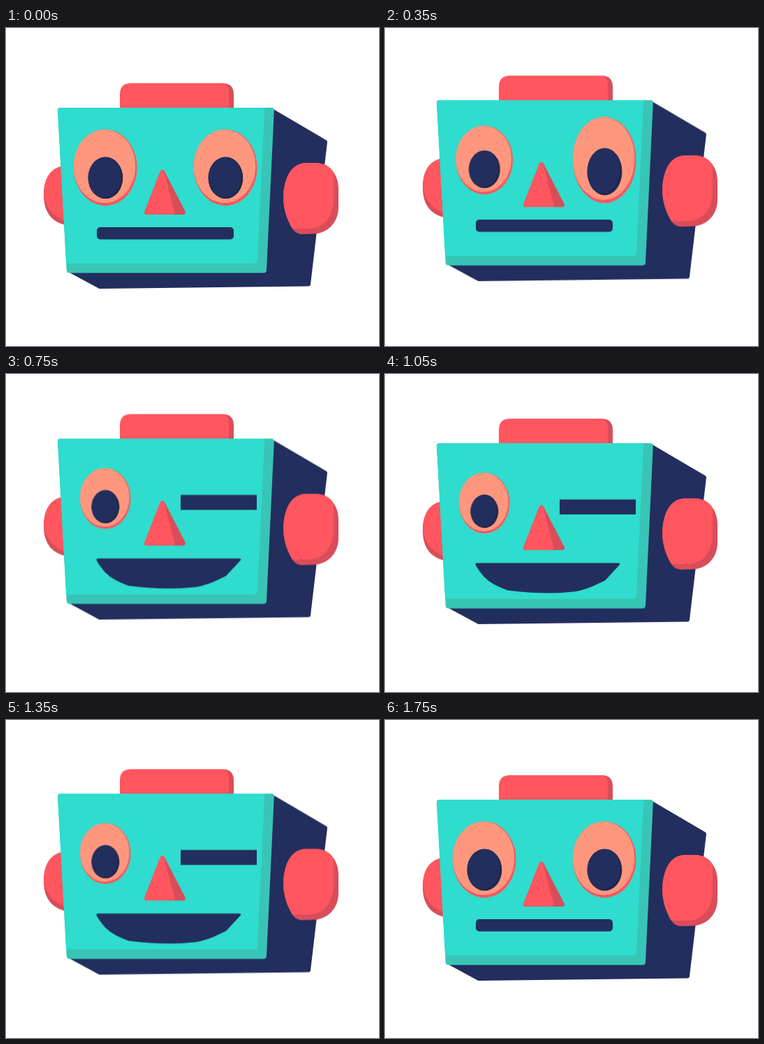
An HTML page for the animation above (1850 ms loop, 534 px wide and 455 px high).

```html
<!DOCTYPE html>
<html lang="en">
<head>
<meta charset="utf-8">
<title>Winking robot</title>
<style>
  html, body { margin: 0; width: 100%; height: 100%; overflow: hidden; background: #fff; }
  svg { display: block; width: 100vw; height: 100vh; }

  .red { fill: #ff565f; }
  .red-dark { fill: #d94d59; }
  .teal { fill: #2fdccd; }
  .teal-dark { fill: #38c5b6; }
  .navy { fill: #222e5e; }
  .navy-dark { fill: #1f274e; }
  .peach { fill: #ff977e; }
  .soft { stroke-linejoin: round; stroke-width: 6; }
  .teal.soft { stroke: #2fdccd; }
  .navy.soft { stroke: #222e5e; }
  .red.soft { stroke: #ff565f; }
  .red-dark.soft { stroke: #d94d59; }

  .head, .left, .right, .plain, .wink { animation: 1850ms infinite; }
  .head { animation-name: bob; }
  .left { animation-name: shrink; transform-origin: 142px 200px; }
  .right { animation-name: stretch; transform-origin: 314px 200px; }
  .plain { animation-name: hide; }
  .wink { animation-name: show; }

  /* Poses change at 50 ms, then every 100 ms */
  @keyframes bob {
    0% { transform: translateY(0); animation-timing-function: step-end; }
    2.7027% { transform: translateY(-2.7px); animation-timing-function: steps(7); }
    40.5405% { transform: translateY(-21.6px); animation-timing-function: steps(10); }
    94.5945%, 100% { transform: translateY(0); }
  }
  @keyframes shrink {
    0% { transform: scale(1); animation-timing-function: step-end; }
    2.7027% { transform: scale(.975); animation-timing-function: steps(7); }
    40.5405% { transform: scale(.8); animation-timing-function: step-end; }
    72.9729% { transform: scale(.8); animation-timing-function: steps(4); }
    94.5945%, 100% { transform: scale(1); }
  }
  @keyframes stretch {
    0% { transform: scaleY(1); animation-timing-function: step-end; }
    2.7027% { transform: scaleY(1.0325); animation-timing-function: steps(3); }
    18.9189% { transform: scaleY(1.13); animation-timing-function: steps(4); }
    40.5405%, 100% { transform: scaleY(1); }
  }
  @keyframes hide {
    0%, 83.7837%, 100% { visibility: visible; animation-timing-function: step-end; }
    40.5405% { visibility: hidden; animation-timing-function: step-end; }
  }
  @keyframes show {
    0%, 83.7837%, 100% { visibility: hidden; animation-timing-function: step-end; }
    40.5405% { visibility: visible; animation-timing-function: step-end; }
  }
</style>
</head>
<body>
<svg viewBox="0 0 534 455">
  <defs>
    <clipPath id="face"><path d="M78 114H380Q384 114 383.8 118L373 346Q373 350.5 368 350.5H91Q87 350.5 86.7 346L74 118Q74 114 78 114Z"/></clipPath>
    <clipPath id="pupil"><ellipse cx="142.5" cy="214.5" rx="25" ry="30"/></clipPath>
    <g id="eye">
      <ellipse class="red" cx="142.2" cy="199.7" rx="45.3" ry="54.5"/>
      <ellipse class="peach" cx="141" cy="197.7" rx="44.2" ry="52.5"/>
      <g clip-path="url(#pupil)">
        <ellipse class="navy-dark" cx="142.5" cy="214.5" rx="25" ry="30"/>
        <ellipse class="navy" cx="139.5" cy="212" rx="25" ry="30"/>
      </g>
    </g>
  </defs>

  <g class="head">
    <!-- antenna and left ear -->
    <path class="red-dark" d="M300 79H310Q326 79 326 95V120H300Z"/>
    <path class="red" d="M163 120V95Q163 79 179 79H309Q319 80 319 92V120Z"/>
    <path class="red-dark" d="M82 197.5C64 200 54 215 54 239C54 264 66 278 86 282Z"/>
    <path class="red" d="M82 197.5C64 200 54 215 54 239C58 260 70 271 86 275Z"/>

    <!-- box -->
    <path class="navy soft" d="M382 119L457 163L433 366.5L134.500 370L92 347Z"/>
    <g clip-path="url(#face)">
      <path class="teal-dark" d="M60 100H400V360H60Z"/>
      <path class="teal" d="M60 100H371L360 332Q360 337 355 337H60Z"/>
    </g>

    <!-- right ear -->
    <path class="red-dark" d="M429 193H444C464 194 476 210 476 230V256C476 279 460 294 440 294.500L424 295C417 295 412 291 408 284C401 271 397 258 397 241C398 218 406 194 429 193Z"/>
    <path class="red" d="M429 193H444C456 193.500 464 198 469 207V250C466 272 454 287 433 287H410C402 273 397 258 397 241C398 218 406 194 429 193Z"/>

    <!-- nose -->
    <path class="red-dark soft" d="M224 206L254 264H201Z"/>
    <path class="red soft" d="M223.500 206L238.500 264H201Z"/>

    <use class="left" href="#eye"/>

    <g class="plain">
      <g class="right"><use href="#eye" x="172"/></g>
      <rect class="navy" x="130" y="285" width="196" height="17.500" rx="5"/>
    </g>
    <g class="wink">
      <rect class="navy" x="250" y="194.600" width="109" height="21.400"/>
      <path class="navy" d="M131 285.500H334Q338 286 335 289L315 310.500L297 319Q280 326 265 327Q225 331 175 324.500Q152 316 142 305.500Q133 295 129.500 288Q129 286 131 285.500Z"/>
    </g>
  </g>
</svg>
</body>
</html>
```
